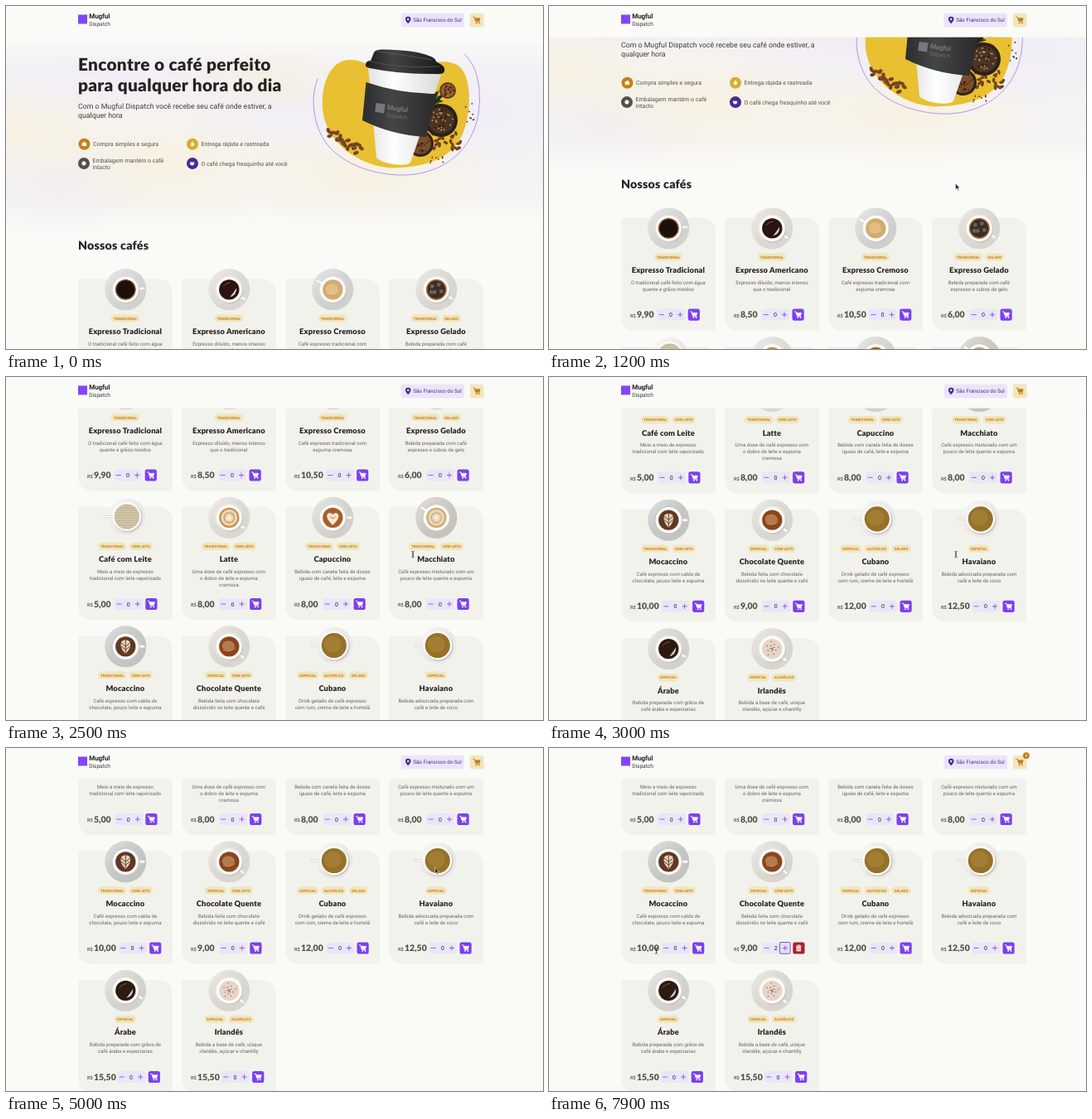
Recreate the animation shown at these times as an HTML page. Size 648 by 414 pixels, loop 8000 ms.

```html
<!DOCTYPE html>
<html lang="pt-BR">
<head>
<meta charset="utf-8">
<title>Cafés</title>
<style>
html, body { margin: 0; width: 100%; height: 100%; overflow: hidden; background: #fafaf6; }
svg { display: block; width: 648px; height: 414px; }
text { font-family: Roboto, sans-serif; text-rendering: geometricPrecision; white-space: pre; }
.head { font-family: Lato, sans-serif; font-weight: 900; fill: #272221; letter-spacing: .015em; }
.tag { font-weight: 700; font-size: 4.4px; fill: #c47f17; }
.desc { font-size: 6.1px; fill: #6a6362; }
.item { font-size: 7px; fill: #574f4d; }
.mid { text-anchor: middle; }
</style>
</head>
<body>
<svg id="stage" viewBox="0 0 648 414" xmlns="http://www.w3.org/2000/svg">
  <defs>
    <radialGradient id="lilac"><stop offset="0" stop-color="#ebe5f9" stop-opacity=".45"/><stop offset="1" stop-color="#ebe5f9" stop-opacity="0"/></radialGradient>
    <radialGradient id="cream"><stop offset="0" stop-color="#f8efcf" stop-opacity=".5"/><stop offset="1" stop-color="#f8efcf" stop-opacity="0"/></radialGradient>
    <linearGradient id="wash" x2="0" y2="1"><stop offset="0" stop-color="#f5f3f4" stop-opacity=".2"/><stop offset=".12" stop-color="#f5f3f4"/><stop offset=".8" stop-color="#f6f4f2"/><stop offset="1" stop-color="#fafaf6" stop-opacity="0"/></linearGradient>
    <linearGradient id="paper"><stop offset="0" stop-color="#e2e2e2"/><stop offset=".35" stop-color="#fff"/><stop offset="1" stop-color="#d9d8d7"/></linearGradient>
    <linearGradient id="sleeve"><stop offset="0" stop-color="#2c2d2e"/><stop offset=".4" stop-color="#444547"/><stop offset="1" stop-color="#29292a"/></linearGradient>
    <linearGradient id="lid"><stop offset="0" stop-color="#1c1c1d"/><stop offset=".35" stop-color="#444"/><stop offset="1" stop-color="#171717"/></linearGradient>
    <linearGradient id="china" x2="1" y2="1"><stop offset="0" stop-color="#fff" stop-opacity=".5"/><stop offset="1" stop-color="#8a8580" stop-opacity=".1"/></linearGradient>
    <g id="cart" fill="none" stroke="currentColor" stroke-linecap="round" stroke-linejoin="round">
      <path d="M-4.2-3.6h1.5l1.7 5.4h4.1" stroke-width="1"/>
      <path d="M-2.2-2.2h6.2l-1 3.2h-4.2z" fill="currentColor" stroke-width=".7"/>
      <circle cx="-.6" cy="3.4" r=".5"/><circle cx="2.7" cy="3.4" r=".5"/>
    </g>
  </defs>
  <g id="page"></g>
  <g id="bar"></g>
  <g id="arrow"><path d="M0 0v7.8l1.8-1.6 1.3 2.8 1.3-.6-1.3-2.7h2.4z" fill="#2b2b2b" stroke="#fff" stroke-width=".6"/></g>
  <g id="beam" fill="none"><path d="M-1.6-3.6q1.4 0 1.6.9v5.6q-.2.9-1.6.9M1.6-3.6q-1.4 0-1.6.9v5.6q.2.9 1.6.9" stroke="#333" stroke-width=".8"/></g>
</svg>
<script>
const NS = 'http://www.w3.org/2000/svg';
const LOOP = 8000, STEP = 100;
const CARD_Y = 329.5, ROW = 155.5, COL_X = 87.3, COL = 125;
const $ = id => document.getElementById(id);
const page = $('page'), bar = $('bar');

function el(parent, name, attrs) {
  const n = document.createElementNS(NS, name);
  for (const k in attrs) n.setAttribute(k, attrs[k]);
  return parent.appendChild(n);
}
function text(parent, x, y, str, attrs) {
  const n = el(parent, 'text', { x, y, ...attrs });
  n.textContent = str;
  return n;
}
const group = (parent, x, y, extra = '') => el(parent, 'g', { transform: `translate(${x} ${y}) ${extra}` });
const rect = (p, x, y, width, height, fill, rx = 0) => el(p, 'rect', { x, y, width, height, fill, rx });
const disc = (p, cx, cy, r, fill) => el(p, 'circle', { cx, cy, r, fill });
const oval = (p, cx, cy, rx, ry, fill) => el(p, 'ellipse', { cx, cy, rx, ry, fill });
const path = (p, d, fill, stroke = 'none', w = 1) =>
  el(p, 'path', { d, fill, stroke, 'stroke-width': w, 'stroke-linecap': 'round', 'stroke-linejoin': 'round' });
const icon = (p, id, x, y, color) => el(p, 'use', { href: '#' + id, x, y, color });

let seed = 7;
const rnd = () => (seed = seed * 16807 % 2147483647) / 2147483647;

function brand(p, x, y, ink) {
  text(p, x, y, 'Mugful', { 'font-size': 8, 'font-weight': 700, fill: ink[0], 'letter-spacing': -.1 });
  text(p, x, y + 8.6, 'Dispatch', { 'font-size': 6.7, fill: ink[1], 'letter-spacing': -.1 });
}

function bean(p, x, y, size, turn) {
  const g = group(p, x, y, `rotate(${turn})`);
  oval(g, 0, 0, size, size * .68, '#85502a');
  path(g, `M${-size * .8} 0q${size * .8}-1.2 ${size * 1.6} 0`, 'none', '#4a2611', .7);
}

function bowl(p, x, y, r, rim, fill, grain) {
  disc(p, x, y, r, rim);
  disc(p, x, y, r * .8, fill);
  for (let i = 0; i < 34; i++) {
    const a = rnd() * 6.283, d = Math.sqrt(rnd()) * r * .7;
    disc(p, x + Math.cos(a) * d, y + Math.sin(a) * d, 1.1, i % 3 ? grain : '#2a160b');
  }
}

function hero() {
  rect(page, 0, 46, 648, 236, 'url(#wash)');
  [[60, 215, 130, 60, 'lilac'], [130, 90, 190, 50, 'lilac'], [350, 120, 170, 70, 'lilac'], [590, 130, 140, 90, 'lilac'],
   [180, 190, 190, 75, 'cream'], [20, 150, 110, 60, 'cream'], [430, 205, 170, 60, 'cream'], [320, 90, 130, 40, 'cream']]
    .forEach(([x, y, a, b, id]) => oval(page, x, y, a, b, `url(#${id})`));

  const big = { class: 'head', 'font-size': 20.8 };
  text(page, 87, 78, 'Encontre o café perfeito', big);
  text(page, 87, 102.6, 'para qualquer hora do dia', big);
  const sub = { 'font-size': 8.75, fill: '#403937' };
  text(page, 87, 124, 'Com o Mugful Dispatch você recebe seu café onde estiver, a', sub);
  text(page, 87, 134.7, 'qualquer hora', sub);

  const perks = [
    [94.5, 166.7, '#c47f17', ['Compra simples e segura'], 'M-2.4-1.2h4.8v3.2h-4.8zM-1-1.2v-1.1h2v1.1'],
    [225, 166.7, '#dbac2c', ['Entrega rápida e rastreada'], 'M0-1.7a2 2 0 1 0 .1 0zM-.8-2.8h1.6'],
    [94, 190, '#574f4d', ['Embalagem mantém o café', 'intacto'], 'M0-2.5l2.2 1.2v2.5l-2.2 1.3-2.2-1.3v-2.5z'],
    [225, 190, '#4b2995', ['O café chega fresquinho até você'], 'M-2.6-1.2h4.4v1.6q0 1.8-2.2 1.8t-2.2-1.8z']
  ];
  for (const [x, y, color, lines, d] of perks) {
    disc(page, x, y, 7, color);
    path(group(page, x, y), d, '#fff', '#fff', .5);
    lines.forEach((s, i) => text(page, x + 10.5, y + 2.6 + (i - (lines.length - 1) / 2) * 8, s, { class: 'item' }));
  }
  product();
  text(page, 87, 294, 'Nossos cafés', { class: 'head', 'font-size': 14.2 });
}

function product() {
  path(page, 'M376 88C368 108 369 138 384 162C402 190 444 205 482 204C530 202 563 173 570 130C574 102 570 74 553 58', 'none', '#a88bf3', .9);
  path(page, 'M382 124C380 95 391 66 414 65C436 64 446 82 470 78C500 72 530 60 547 73C563 87 561 128 552 152C542 180 512 194 474 195C436 198 386 170 382 124Z', '#e8c031');
  for (let i = 0; i < 9; i++)
    path(group(page, 512, 114, `rotate(${-100 + i * 26})`), 'M0 0q6-5 16 0q-9 5-16 0', i % 2 ? '#3f6b2c' : '#28491f');
  path(page, 'M532 102L514 120', 'none', '#2c1b12', 3);
  bowl(page, 533, 102, 10, '#5a3a22', '#9a6638', '#7a4a26');
  for (let i = 0; i < 26; i++) bean(page, 515 + rnd() * 34, 152 + rnd() * 22, 2.8, rnd() * 180);
  bowl(page, 525, 138, 20, '#2c2019', '#4c3422', '#a78a62');
  bowl(page, 500, 166, 16, '#33231a', '#7a4f2c', '#5b3519');
  for (let i = 0; i < 9; i++) disc(page, 552 + rnd() * 13, 115 + rnd() * 28, .9, '#4a2c18');
  for (let i = 0; i < 8; i++) disc(page, 504 + rnd() * 26, 181 + rnd() * 9, .9, '#4a2c18');

  path(page, 'M437 74L525 83L488 189Q484 193 467 191Q451 188 447 183Z', 'url(#paper)');
  path(page, 'M434.5 92Q476 106 520 106L507 158Q466 156 430 138Z', 'url(#sleeve)');
  path(page, 'M444 56Q446 52 456 52.5Q494 53 513 61Q519 64 519 67L524 70Q530 73 529 78Q529 82 522 82Q478 83 439 75Q433 74 434 70Q435 66 440 66Z', 'url(#lid)');
  path(page, 'M440 67Q477 76 523 73M448 55Q482 59 514 65', 'none', '#5b5b5c', .8);
  const mark = group(page, 447, 115, 'rotate(8)');
  rect(mark, 0, 2, 11, 11, '#77787b');
  brand(mark, 14, 8, ['#77787b', '#6c6d70']);
  for (let i = 0; i < 23; i++) bean(page, 389 + i * 1.5 + rnd() * 7, 149 + i * .9 + rnd() * 10, 3.3, rnd() * 180);
}

const T = 'TRADICIONAL', L = 'COM LEITE', E = 'ESPECIAL', A = 'ALCOÓLICO', G = 'GELADO';
// name, tags, description, price, stepper offset, saucer, drink, surface, handle angle
const drinks = [
  ['Expresso Tradicional', [T], 'O tradicional café feito com água|quente e grãos moídos', '9,90', 48.6, '#dcdddd', '#1c100a', 'rim', -4],
  ['Expresso Americano', [T], 'Expresso diluído, menos intenso|que o tradicional', '8,50', 49.4, '#e7e3de', '#2b140f', 'shine', 32],
  ['Expresso Cremoso', [T], 'Café expresso tradicional com|espuma cremosa', '10,50', 54, '#d9dadb', '#d3ab70', 'foam', 210],
  ['Expresso Gelado', [T, G], 'Bebida preparada com café|expresso e cubos de gelo', '6,00', 50.4, '#e5e1db', '#3b2c25', 'ice', 30],
  ['Café com Leite', [T, L], 'Meio a meio de expresso|tradicional com leite vaporizado', '5,00', 49.2, '#fbfbfa', '#c9b99a', 'lines', 180],
  ['Latte', [T, L], 'Uma dose de café expresso com|o dobro de leite e espuma|cremosa', '8,00', 50, '#e8e5e0', '#c98d4c', 'swirl', 35],
  ['Capuccino', [T, L], 'Bebida com canela feita de doses|iguais de café, leite e espuma', '8,00', 50.4, '#dedbd7', '#a65f2b', 'heart', 0],
  ['Macchiato', [T, L], 'Café expresso misturado com um|pouco de leite quente e espuma', '8,00', 50.4, '#cfcbc4', '#cba873', 'swirl', 215],
  ['Mocaccino', [T, L], 'Café expresso com calda de|chocolate, pouco leite e espuma', '10,00', 54, '#c9cbcc', '#603824', 'leaf', 0],
  ['Chocolate Quente', [E, L], 'Bebida feita com chocolate|dissolvido no leite quente e café', '9,00', 50.2, '#e6e2dc', '#8b451d', 'foam', 38],
  ['Cubano', [E, A, G], 'Drink gelado de café expresso|com rum, creme de leite e hortelã', '12,00', 54.4, '#fbfbfa', '#967128', 'plain', 180],
  ['Havaiano', [E], 'Bebida adocicada preparada com|café e leite de coco', '12,50', 53.4, '#fbfbfa', '#967128', 'plain', 180],
  ['Árabe', [E], 'Bebida preparada com grãos de|café árabe e especiarias', '15,50', 52.6, '#dedcd8', '#2d1a10', 'shine', 25],
  ['Irlandês', [E, A], 'Bebida a base de café, uísque|irlandês, açúcar e chantilly', '15,50', 53, '#e5e1db', '#e6d5c8', 'dots', 40]
];

function cup(p, saucer, drink, top, turn) {
  const wide = turn === 180;
  const g = group(p, wide ? 58.5 : 57, wide ? 11.5 : 12.8);
  const r = wide ? 22.5 : 25;
  disc(g, 0, 0, r, saucer);
  disc(g, 0, 0, r, 'url(#china)');
  disc(g, 0, 0, r * .7, saucer);
  const h = group(g, 0, 0, `rotate(${turn})`);
  path(h, wide ? 'M14-1h14v2h-14z' : 'M13-1.5h9q3 1.5 0 3h-9z', '#fff', '#cfcbc6', .6);
  const cr = wide ? 17.5 : 15.6;
  oval(g, 1, 1.2, cr + .4, cr + .4, '#c9c4be');
  disc(g, 0, 0, cr, '#fdfcfa');
  const d = cr * (wide ? .86 : .78);
  disc(g, 0, 0, d, drink);
  const line = (s, c, w) => path(g, s, 'none', c, w);
  const paint = {
    rim() { el(g, 'circle', { r: d - .6, fill: 'none', stroke: '#8d5528', 'stroke-width': 1.2 }); },
    shine() { path(g, 'M1 9Q9 7 9-2Q5 4 1 9Z', '#d9d0c8'); line('M-7-4Q-4-8 1-8.5', '#7a5340', 1); },
    foam() { oval(g, -1, -1, d * .62, d * .5, 'rgba(255,225,175,.35)'); line('M-7 4Q0 8 7 2', 'rgba(255,235,200,.5)', 1); },
    ice() {
      el(g, 'circle', { r: d - .6, fill: 'none', stroke: '#a0692f', 'stroke-width': 1.6 });
      [[-5, -4], [3, -6], [-2, 3], [6, 2], [-6, 3]].forEach(([x, y], i) =>
        rect(group(g, x, y, `rotate(${i * 27})`), -2.2, -2.2, 4.4, 4.4, '#6b625c', .8));
    },
    lines() {
      for (let y = -12; y < 13; y += 3) {
        const half = Math.sqrt(d * d - y * y);
        line(`M${-half} ${y}h${2 * half}`, '#d9ccb2', .9);
      }
    },
    swirl() {
      disc(g, 0, 0, d * .82, '#ead6b4');
      el(g, 'circle', { r: d * .5, fill: 'none', stroke: drink, 'stroke-width': 1.1 });
      disc(g, 0, 0, d * .22, '#f6ecd9');
    },
    heart() { path(g, 'M0 9Q-8 2-7-3Q-5-8 0-4Q5-8 7-3Q8 2 0 9Z', '#f5e6d0'); line('M-3-1Q0 3 3-1', '#b87741', 1); },
    leaf() {
      path(g, 'M0 9Q-8 1-5-6Q0-10 5-6Q8 1 0 9Z', '#e5d2bd');
      line('M0-8V8M-5-4L0 0L5-4M-5 0L0 4L5 0', '#6f432b', 1);
    },
    dots() { for (let i = 0; i < 16; i++) disc(g, Math.cos(i * 2.4) * i * .6, Math.sin(i * 2.4) * i * .6, .7, '#85513b'); },
    plain() { oval(g, -1.5, -1.5, d * .7, d * .65, 'rgba(190,150,75,.35)'); }
  };
  paint[top]();
}

function tags(p, list) {
  const pills = list.map(s => {
    const t = text(p, 0, 49.1, s, { class: 'tag mid' });
    return { t, w: t.getComputedTextLength() + 6.6 };
  });
  let x = 56.6 - (pills.reduce((a, b) => a + b.w, 0) + 2.8 * (pills.length - 1)) / 2;
  for (const { t, w } of pills) {
    p.insertBefore(rect(p, x, 42.7, w, 9.4, '#f1e6bf', 4.7), t);
    t.setAttribute('x', x + w / 2);
    x += w + 2.8;
  }
}

const live = {};
function card(i) {
  const [name, list, desc, price, step, saucer, drink, top, turn] = drinks[i];
  const g = group(page, COL_X + i % 4 * COL, CARD_Y + Math.floor(i / 4) * ROW);
  path(g, 'M2.6 0H97.6a16 16 0 0 1 16 16V133.4a2.6 2.6 0 0 1-2.6 2.6H16a16 16 0 0 1-16-16V2.6a2.6 2.6 0 0 1 2.6-2.6z', '#f2f2ed');
  cup(g, saucer, drink, top, turn);
  tags(g, list);
  text(g, 56.6, 66.4, name, { class: 'head mid', 'font-size': 9.3 });
  desc.split('|').forEach((s, k) => text(g, 56.6, 80.1 + k * 7.95, s, { class: 'desc mid' }));
  text(g, 10.6, 120.2, 'R$', { 'font-size': 5.7, fill: '#574f4d', 'font-weight': 500 });
  text(g, 18.6, 120.6, price, { class: 'head', 'font-size': 10.5, style: 'fill:#574f4d;letter-spacing:0' });

  const s = group(g, step, 117);
  rect(s, -5.4, -7.1, 33.8, 14, '#ebe5f9', 2.6);
  path(s, 'M-2.6 0h5.2', 'none', '#6d4bc0', .8);
  const count = text(s, 11.2, 2.5, '0', { class: 'mid', 'font-size': 7, fill: '#272221' });
  const focus = el(s, 'rect', { x: 15.9, y: -7, width: 12.8, height: 13.8, rx: 1.6, fill: '#e4dcf8', stroke: '#5a3bb0', 'stroke-width': .8, visibility: 'hidden' });
  path(s, 'M19.7 0h5.2M22.3-2.6v5.2', 'none', '#6d4bc0', .8);
  const btn = rect(s, 31.8, -7.1, 14.2, 14.2, '#7c3ff2', 2.6);
  const buy = icon(s, 'cart', 38.9, 0, '#fff');
  if (name === 'Chocolate Quente') {
    const bin = group(s, 38.9, 0);
    path(bin, 'M-3.2-2.5h6.4M-1.2-3.5h2.4', 'none', '#fff', .9);
    path(bin, 'M-2.3-1.6h4.6v5.2h-4.6z', '#fff', '#fff', .5);
    path(bin, 'M-.8 0v2.3M.8 0v2.3', 'none', '#a9202f', .6);
    Object.assign(live, { count, focus, btn, buy, bin });
  }
}

function header() {
  rect(bar, 0, 0, 648, 37.7, '#fafaf7');
  rect(bar, 87, 10.5, 11, 11, '#8047f8');
  brand(bar, 100.3, 15, ['#272221', '#403937']);
  rect(bar, 476.6, 8.8, 76.4, 16.8, '#ebe5f9', 2.6);
  path(bar, 'M485.2 21.2Q481.9 18.2 481.9 16.1A3.3 3.3 0 0 1 488.5 16.1Q488.5 18.2 485.2 21.2Z', '#4b2995');
  disc(bar, 485.2, 16, 1.2, '#ebe5f9');
  text(bar, 491.2, 19.4, 'São Francisco do Sul', { 'font-size': 6.3, fill: '#4b2995' });
  rect(bar, 559.8, 8.8, 16.8, 16.8, '#f1e6bf', 2.6);
  icon(bar, 'cart', 568.2, 17, '#c47f17');
  const badge = live.badge = el(bar, 'g', {});
  disc(badge, 575.9, 9.2, 3.9, '#c47f17');
  text(badge, 575.9, 11, '1', { class: 'mid', 'font-size': 5, 'font-weight': 700, fill: '#fff' });
}

// Monotone cubic through [time, value] keys
function curve(keys) {
  const slope = keys.slice(1).map((k, i) => (k[1] - keys[i][1]) / (k[0] - keys[i][0]));
  const tan = keys.map((_, i) => {
    const a = slope[i - 1], b = slope[i];
    return a * b > 0 ? 2 * a * b / (a + b) : 0;
  });
  return t => {
    if (t <= keys[0][0]) return keys[0][1];
    const i = keys.findIndex(k => k[0] >= t) - 1;
    if (i < 0) return keys[keys.length - 1][1];
    const h = keys[i + 1][0] - keys[i][0], u = (t - keys[i][0]) / h, v = 1 - u;
    return v * v * (1 + 2 * u) * keys[i][1] + u * u * (3 - 2 * u) * keys[i + 1][1]
      + h * u * v * (v * tan[i] - u * tan[i + 1]);
  };
}
const scrollAt = curve([[500, 0], [700, 15.5], [1800, 166], [2500, 328], [3200, 511], [3800, 524], [4200, 524], [4700, 514.5], [5000, 516]]);
const moveX = curve([[100, 592], [400, 490], [700, 490], [1800, 491], [4300, 491], [5000, 517.5], [5400, 500], [6000, 400], [6400, 204], [6800, 283], [7400, 283], [7900, 129.5]]);
const moveY = curve([[100, 340], [400, 216], [1000, 214], [4300, 214], [5000, 144], [5400, 165], [6000, 250], [6400, 248], [6800, 241], [7400, 241], [7900, 244.5]]);

function overText(x, y) {
  const off = y - CARD_Y, inCard = (x - COL_X) % COL;
  if (off < 0 || inCard > 113) return false;
  const v = off % ROW;
  return v > 42 && v < 92 || v > 111 && v < 124 && inCard > 10 && inCard < 45;
}
const show = (n, on) => n.setAttribute('visibility', on ? 'visible' : 'hidden');

function draw(t) {
  const y = scrollAt(t), mx = moveX(t), my = moveY(t);
  page.setAttribute('transform', `translate(0 ${-y})`);
  const typing = overText(mx, my + y), moved = t >= 100;
  for (const [id, on] of [['arrow', !typing], ['beam', typing]]) {
    $(id).setAttribute('transform', `translate(${mx} ${my})`);
    show($(id), on && moved);
  }
  const n = t < 7100 ? 0 : t < 7300 ? 1 : 2;
  live.count.textContent = n;
  live.btn.setAttribute('fill', n ? '#a9202f' : '#7c3ff2');
  show(live.focus, t >= 6900);
  show(live.buy, !n);
  show(live.bin, n);
  show(live.badge, n);
}

hero();
drinks.forEach((_, i) => card(i));
header();
const start = performance.now();
function tick(now) {
  const t = Math.max(0, now - start) % LOOP;
  draw(Math.floor(t / STEP) * STEP);
  requestAnimationFrame(tick);
}
draw(0);
requestAnimationFrame(tick);
</script>
</body>
</html>
```
